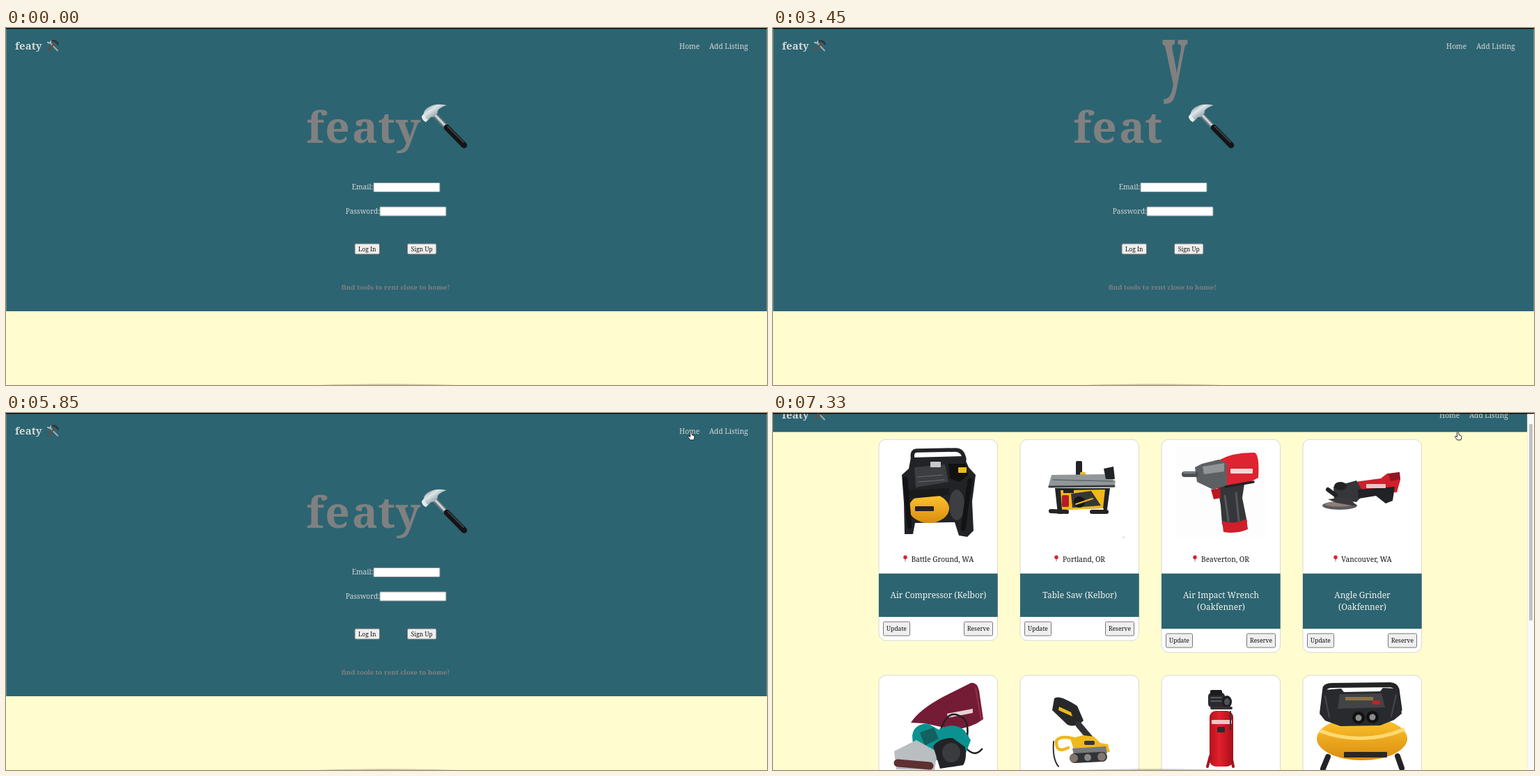
These frames come from a looping animation (1093 by 513 pixels, 7410 ms). An HTML page:

```html
<!DOCTYPE html>
<html lang="en">
<head>
<meta charset="utf-8">
<title>Tool rental</title>
<style>
html, body { margin: 0; width: 100%; height: 100%; overflow: hidden; background: #fffdd0; }
svg { display: block; width: 100vw; height: 100vh; font-family: "Noto Serif", serif; font-size: 10.1px; }
.mid { text-anchor: middle; }
.end { text-anchor: end; }
.medium { font-weight: 500; }
.bold { font-weight: 700; }
.hero { font-size: 62px; font-weight: 700; fill: #808080; text-anchor: middle; }
.line { fill: none; stroke-linecap: round; stroke-linejoin: round; }
</style>
</head>
<body>
<svg id="stage" viewBox="0 0 1093 513" xmlns="http://www.w3.org/2000/svg"></svg>
<script>
const LOOP = 7410, TEAL = '#2c6472', PALE = '#d5d8d5', INK = '#222326', YELLOW = '#efb91c';
const stage = document.getElementById('stage');

const rect = (x, y, w, h, fill, r = 0, more = '') =>
  `<rect x="${x}" y="${y}" width="${w}" height="${h}" rx="${r}" fill="${fill}" ${more}/>`;
const text = (x, y, s, fill, cls = '', size = '') =>
  `<text x="${x}" y="${y}" fill="${fill}" class="${cls}" ${size && `style="font-size:${size}px"`}>${s}</text>`;
const path = (d, fill, more = '') => `<path d="${d}" fill="${fill}" ${more}/>`;
const line = (d, color, w) => `<path class="line" d="${d}" stroke="${color}" stroke-width="${w}"/>`;
const oval = (x, y, rx, ry, fill) => `<ellipse cx="${x}" cy="${y}" rx="${rx}" ry="${ry}" fill="${fill}"/>`;
const group = (id, body) => `<g id="${id}">${body}</g>`;
const button = (x, y, w, h, label) =>
  rect(x + .5, y + .5, w - 1, h - 1, '#efefef', 1.8, 'stroke="#777"') +
  text(x + w / 2, y + h / 2 + 3.1, label, '#111', 'mid medium', 8.5);
const field = (x, y) => rect(x + .5, y + .5, 95, 13, '#fff', 1, 'stroke="#8a979b"');

const defs = `<defs>
  <linearGradient id="steel" x1="0" y1="0" x2="1" y2="1">
    <stop offset="0" stop-color="#59666b"/><stop offset=".35" stop-color="#dde6e9"/>
    <stop offset=".65" stop-color="#8b999f"/><stop offset="1" stop-color="#b9c4c8"/></linearGradient>
  <linearGradient id="gold" x1="0" y1="0" x2="0" y2="1">
    <stop offset="0" stop-color="#ffc52e"/><stop offset="1" stop-color="#d98d10"/></linearGradient>
  <linearGradient id="red" x1="0" y1="0" x2="1" y2="0">
    <stop offset="0" stop-color="#b5121d"/><stop offset=".4" stop-color="#e3202d"/><stop offset="1" stop-color="#a90f19"/></linearGradient>
  <radialGradient id="shade"><stop offset="0" stop-color="#000" stop-opacity=".3"/>
    <stop offset=".8" stop-color="#000" stop-opacity=".2"/><stop offset="1" stop-color="#000" stop-opacity="0"/></radialGradient>
</defs>`;

const badge =
  line('M64 22 L74 32.5', '#a3abad', 2) + line('M60 20.5 Q63 23.5 65 18.5', '#b9c1c3', 1.9) +
  line('M70 22 L60.5 32', '#6d4a35', 2.1) + line('M66.5 18.5 Q72 18 74.5 23', '#30383b', 2.8);
const brand = text(13, 31, 'featy', PALE, 'bold', 15) + badge;
const menu = shift => text(967 - shift, 30, 'Home', PALE, '', 10.3) + text(1010 - shift, 30, 'Add Listing', PALE, '', 10.3);

const hammer =
  line('M612 121 L632 142', '#6c787d', 7) + line('M612 120.5 L631 140.5', '#ccd5d8', 3.2) +
  line('M633 143 L658 168.5', '#141516', 8.6) + line('M634.5 141.5 L657 164', '#3e4245', 1.8) +
  path('M633 111 Q616 107 605 115 Q600 119 600 123 L597 127 Q598 133 603 135 L608 131 Q610 127 614 128 L620 122 Q618 116 633 111Z', 'url(#steel)') +
  path('M597 127 Q598 133 603 135 L606 132 Q602 129 600 124Z', '#e6ecee');

const slots = [444, 476, 515.5, 546.5, 577.5];
const letters = [...'featy'].map((c, i) => `<text id="c${i}" class="hero" x="${slots[i]}" y="165">${c}</text>`).join('');

const login = rect(0, 0, 1093, 407, TEAL) + rect(0, 0, .6, 407, '#7d9ca4') + rect(1092.4, 0, .6, 407, '#7d9ca4') +
  brand + menu(0) + letters + group('hammer', hammer) +
  text(527.5, 232, 'Email:', PALE, 'end') + field(527.5, 222) +
  text(537, 266.5, 'Password:', PALE, 'end') + field(536.5, 256.5) +
  button(500.5, 309.5, 36.5, 16, 'Log In') + button(576, 309.5, 42.5, 16, 'Sign Up') +
  text(559.5, 375.5, 'find tools to rent close to home!', '#808080', 'mid bold', 9.7);

// Product pictures, in page coordinates
const pictures = [
  // Cordless compressor
  line('M201 90 Q198 77 207 77 L262 76 Q273 76 275 90', INK, 5.5) +
  path('M198 87 L274 85 L281 101 L291 112 L286 150 L288 192 L279 201 L267 199 L261 180 L204 181 L201 197 L189 197 L188 152 L185 112 L195 103Z', INK) +
  path('M203 101 L247 97 L252 122 L205 130Z', '#3c3d41') + path('M252 96 L276 96 L280 112 L268 122 L254 117Z', '#111') +
  line('M207 115 L244 112 M209 122 L246 119', '#6b6c70', 1.2) + rect(226, 93, 15, 8, '#c5c9cd', 1) + rect(266, 101, 12, 8, YELLOW, 1) +
  oval(224, 160, 29, 21, 'url(#gold)') + rect(204, 157, 27, 7, INK, 1) + path('M194 134 L254 131 L252 141 L198 146Z', '#191a1c') +
  oval(264, 155, 11, 22, '#3d3e42') + line('M190 118 L196 186 M283 120 L273 189', '#121314', 7),

  // Table saw
  path('M405 131 L484 131 L479 168 L409 168Z', INK) + path('M413 134 L477 133 L474 160 L415 162Z', YELLOW) +
  path('M428 139 L457 135 L471 156 L430 159Z', '#35363a') + oval(440, 151, 8, 8, '#151618') +
  line('M435 154 L459 146', YELLOW, 2) + rect(415, 141, 10, 17, '#b51b2a', 2) + rect(417, 133, 15, 5, INK) +
  path('M415 162 L475 160 L473 169 L417 169Z', '#fff') + line('M399 164 L422 165 M458 165 L479 165', INK, 6) +
  rect(435, 92, 9, 25, INK, 2) + rect(441, 108, 8, 9, YELLOW, 1) +
  path('M400 112 L478 111 L492 121 L490 130 L395 130Z', '#92979a') + line('M397 129 L490 128', '#3e4144', 3) +
  line('M402 119 L488 121', '#62676a', 1.5) + path('M475 103 L489 100 L491 118 L478 118Z', INK) +
  rect(502, 201, 3, .7, '#aaa'),

  // Impact wrench
  rect(578, 72, 130, 130, '#fdfdfd') +
  path('M638 126 L677 125 L674 145 L681 180 Q667 190 645 183 L643 156Z', '#35363a') + line('M649 142 L654 178 M665 138 L669 178', '#55575b', 3) +
  path('M645 178 Q664 184 680 175 L682 190 Q667 197 647 194Z', '#cf1f2b') +
  path('M640 91 Q661 79 692 80 Q699 84 697 116 Q676 128 646 128Z', '#de2331') +
  path('M606 101 L616 96 L640 90 L652 95 L652 127 L632 133 L609 122Z', '#5d6063') + path('M617 100 L648 95 L648 107 L619 111Z', '#919497') +
  line('M591 111 L607 111', '#4d5053', 8) + line('M590 109 L606 109', '#85888b', 2) + path('M629 133 L642 131 L643 145 L633 147Z', '#ba1824') +
  line('M650 129 L690 122', INK, 3.5) + rect(657, 103, 32, 7, '#f3d6d6', 1),

  // Angle grinder
  path('M836 122 L873 117 L882 110 L899 108 L901 119 L896 137 L843 139Z', '#cf202c') +
  path('M805 129 L838 120 L849 139 L838 151 L806 147Z', '#35363a') + path('M840 133 L893 129 L890 149 L880 153 L866 142 L841 146Z', '#212225') +
  path('M884 111 L900 108 L901 118 L887 121Z', '#8f1722') + rect(852, 125, 28, 6, '#ecc5c5', 1) +
  oval(814, 156, 25, 6, '#5d5c5f') + oval(813, 154, 20, 3.6, '#8e7f78') + path('M797 147 L827 143 L838 157 L809 152Z', '#39393d') +
  oval(815, 128, 9, 6, '#222') + line('M797 133 L808 141', INK, 6),

  // Belt sander with bag
  path('M198 468 Q210 449 246 430 L284 411 Q293 409 296 422 L302 463 Q285 476 259 478 L218 469Z', '#741b35') +
  line('M291 418 L299 463', '#933149', 2) + path('M250 455 L287 448 L287 454 L251 461Z', '#e3d2d5') +
  line('M240 481 Q250 449 267 458 Q286 463 276 503 Q289 519 300 506', '#222', 2.6) +
  path('M200 487 Q202 470 222 469 L238 478 Q260 466 275 479 L284 493 L277 512 L240 523 L202 512Z', '#0b9290') +
  path('M211 482 L231 475 L238 491 L218 501Z', '#12605f') + path('M174 509 L206 493 L236 510 L232 536 L177 535Z', '#b9bec0') +
  line('M179 526 L225 530', '#5e3031', 11) + path('M230 502 Q238 490 258 490 L276 503 Q279 520 273 529 L240 534Z', INK) +
  oval(256, 511, 13, 14, '#3a3b3e'),

  // Compact sander with bag
  path('M404 433 Q411 427 437 444 L446 465 Q435 476 423 471 L401 450Z', '#27282a') +
  path('M411 445 L428 453 L430 459 L410 450Z', YELLOW) + line('M439 471 L455 490', '#303236', 9) +
  line('M424 504 Q406 513 407 494 Q413 486 432 491', YELLOW, 4.5) +
  path('M427 491 L445 486 L461 488 L470 497 L481 499 L484 510 L435 516Z', YELLOW) + path('M430 505 L478 502 L480 512 L432 515Z', '#77797b') +
  line('M433 519 L473 517', '#323335', 14) + oval(432, 519, 6, 6, '#83766f') + oval(472, 517, 6, 6, '#83766f') +
  oval(452, 518, 5, 5, '#86898b') + line('M403 495 Q401 520 410 531', '#222', 1.8) + rect(447, 494, 15, 6, '#353538', 2),

  // Upright compressor
  rect(625, 425, 24, 21, '#2a2b2e', 5) + rect(628, 421, 17, 8, '#1b1c1e', 2) + line('M629 432 L644 432 M629 437 L644 437', '#67696d', 1.3) +
  oval(652, 438, 7, 9, '#1d1e20') + oval(652, 438, 4, 5, '#505256') + line('M630 447 L658 447', '#333', 4) +
  rect(627, 451, 34, 80, 'url(#red)', 9) + rect(630, 464, 29, 6, '#efc6c6', 1) +
  rect(638, 474, 11, 8, '#2b2b2d', 1) + line('M628 516 L624 531 M658 516 L661 531', '#a51420', 4) + line('M657 452 L657 478', '#333', 2),

  // Pancake compressor
  oval(846, 491, 65, 31, 'url(#gold)') + line('M789 451 L793 418 Q795 415 802 414.5 L886 413.5 Q894 414 896 420 L900 449', INK, 7) +
  path('M791 421 L816 419 L820 424 L872 423 L876 418 L897 419 L903 455 L892 464 L872 472 L815 473 L793 465 L785 455Z', '#292a2d') +
  path('M814 427 L874 426 L879 446 L811 448Z', '#424347') + rect(822, 431, 40, 5, '#8d7341') + rect(861, 436, 11, 6, '#b42727') +
  oval(841, 461, 9, 9, '#111') + oval(861, 460, 9, 9, '#111') + oval(841, 461, 4.5, 4.5, '#8a8b8d') + oval(861, 460, 4.5, 4.5, '#8a8b8d') +
  line('M793 430 L799 460 M895 428 L888 459', '#47484b', 2) + path('M786 477 Q845 500 906 475 L908 480 Q846 505 784 482Z', '#ffda70') +
  rect(820, 510, 62, 8, '#2c2721', 1) + line('M797 517 L790 534 M897 516 L903 533', INK, 8)
];

const cards = [
  ['Battle Ground, WA', -47.5, 'Air Compressor (Kelbor)'],
  ['Portland, OR', -33.5, 'Table Saw (Kelbor)'],
  ['Beaverton, OR', -37.5, 'Air Impact Wrench', '(Oakfenner)'],
  ['Vancouver, WA', -38.5, 'Angle Grinder', '(Oakfenner)']
];
const frame = (x, y, h) => rect(x, y + .5, 170.5, h, '#fff', 10, 'stroke="#d8d8d2"');
const card = ([place, pin, ...title], i) => {
  const x = 152 + i * 203, cx = x + 85.5, extra = (title.length - 1) * 17;
  return frame(x, 60.5, 289 + extra) +
    line(`M${cx + pin} 231 V236`, '#9aa0a2', 1.3) + oval(cx + pin, 230.3, 2.7, 2.9, '#d8232f') +
    text(cx + 6, 237, place, '#111', 'mid medium') +
    rect(x, 253.7, 170.7, 62.3 + extra, TEAL) +
    title.map((s, n) => text(cx, 289 + n * 17, s, '#f3f3ec', 'mid', 11.9)).join('') +
    button(x + 6, 322.5 + extra, 39, 21, 'Update') + button(x + 122, 322.5 + extra, 42, 21, 'Reserve') +
    frame(x, 399.5, 300);
};
const listing = rect(0, 0, 1093, 513, '#fffdd0') +
  group('page', rect(0, 0, 1083.5, 50.3, TEAL) + brand + menu(10) + cards.map(card).join('') +
    pictures.map((p, i) => group('p' + i, p)).join('')) +
  rect(1083.5, 0, 9.5, 513, '#fafafa') + rect(1083.5, 0, .6, 513, '#e6e6e6') +
  group('thumb', rect(1086, 4, 5, 283, '#c2c2c2', 2.5));

const hand = path('M-1.6 -5 Q-.3 -6.4 .7 -4.9 L1.2 -1.5 L4 -.6 Q5.2 0 4.8 2.5 L3.9 5.8 H-1.3 L-4.3 1.5 Q-4.5 0 -3 .2 L-1.2 1.4Z',
  '#fff', 'stroke="#111" stroke-width=".9"');
const arrow = path('M-4 -6 L-4 5 L-1.4 2.7 L.3 6.3 L2 5.5 L.4 2 L4 1.8Z', '#111', 'stroke="#fff" stroke-width=".8"');

stage.innerHTML = defs + group('login', login) + group('listing', listing) +
  group('cursor', group('arrow', arrow) + group('hand', hand)) +
  oval(547, 515, 134, 4, 'url(#shade)') + rect(0, 0, 1093, 1.2, '#000');

const el = id => document.getElementById(id);
const show = (id, on) => el(id).setAttribute('display', on ? 'inline' : 'none');
const move = (id, value) => el(id).setAttribute('transform', value);
const ease = p => p * p * (3 - 2 * p);

// Eased value at time t through [time, value] keys
function track(t, keys) {
  if (t <= keys[0][0]) return keys[0][1];
  for (let i = 1; i < keys.length; i++) {
    const [a, u] = keys[i - 1], [b, v] = keys[i];
    if (t < b) return u + (v - u) * ease((t - a) / (b - a));
  }
  return keys[keys.length - 1][1];
}

function drawLetters(t) {
  const tip = track(t, [[150, 0], [530, -90], [860, -90], [1460, 0]]);
  move('c0', `rotate(${tip} 443 154)`);
  const ox = track(t, [[860, 0], [1030, 150], [1180, 150], [1335, 0]]);
  const oy = track(t, [[860, 0], [1030, 19], [1200, -95], [1400, -91], [1580, 0]]);
  move('c1', `translate(${ox} ${oy})`);
  move('c2', `translate(0 ${track(t, [[1650, 0], [2200, 41], [2990, 41], [3450, 0]])})`);
  const flip = track(t, [[2350, 1], [2660, -1], [2990, -1], [3450, 1]]);
  move('c3', `translate(546.5 0) scale(${flip} 1) translate(-546.5 0)`);
  const up = t < 4410;
  const rise = up ? track(t, [[2990, 0], [3450, -70], [3640, -70], [3900, -85], [4330, -50]]) : 0;
  const tall = up ? track(t, [[2990, 1], [3450, 1.9]]) : 1;
  move('c4', `translate(0 ${181 + rise}) scale(1 ${tall}) translate(0 -181)`);
  const swing = track(t, [[3900, 0], [4310, -46], [4550, -46], [5050, 0]]);
  move('hammer', `rotate(${swing} 601 168)`);
}

const loadTimes = [7290, 6580, 6580, 6650, 6330, 6330, 6410, 6410];

function draw(t) {
  const onListing = t >= 6140;
  show('login', !onListing);
  show('listing', onListing);
  if (onListing) {
    const scroll = t < 7290 ? 0 : t < 7330 ? 10 : 23;
    move('page', `translate(0 ${-scroll})`);
    move('thumb', `translate(0 ${scroll / 2})`);
    loadTimes.forEach((at, i) => show('p' + i, t >= at));
  } else drawLetters(t);
  const y = track(t, [[5420, -8], [5850, 33]]);
  show('cursor', t >= 5440);
  show('hand', y >= 20);
  show('arrow', y < 20);
  move('cursor', `translate(${track(t, [[5460, 979], [5850, 984]])} ${y})`);
}

const start = performance.now();
function tick() {
  draw((performance.now() - start) % LOOP);
  requestAnimationFrame(tick);
}
tick();
</script>
</body>
</html>
```
